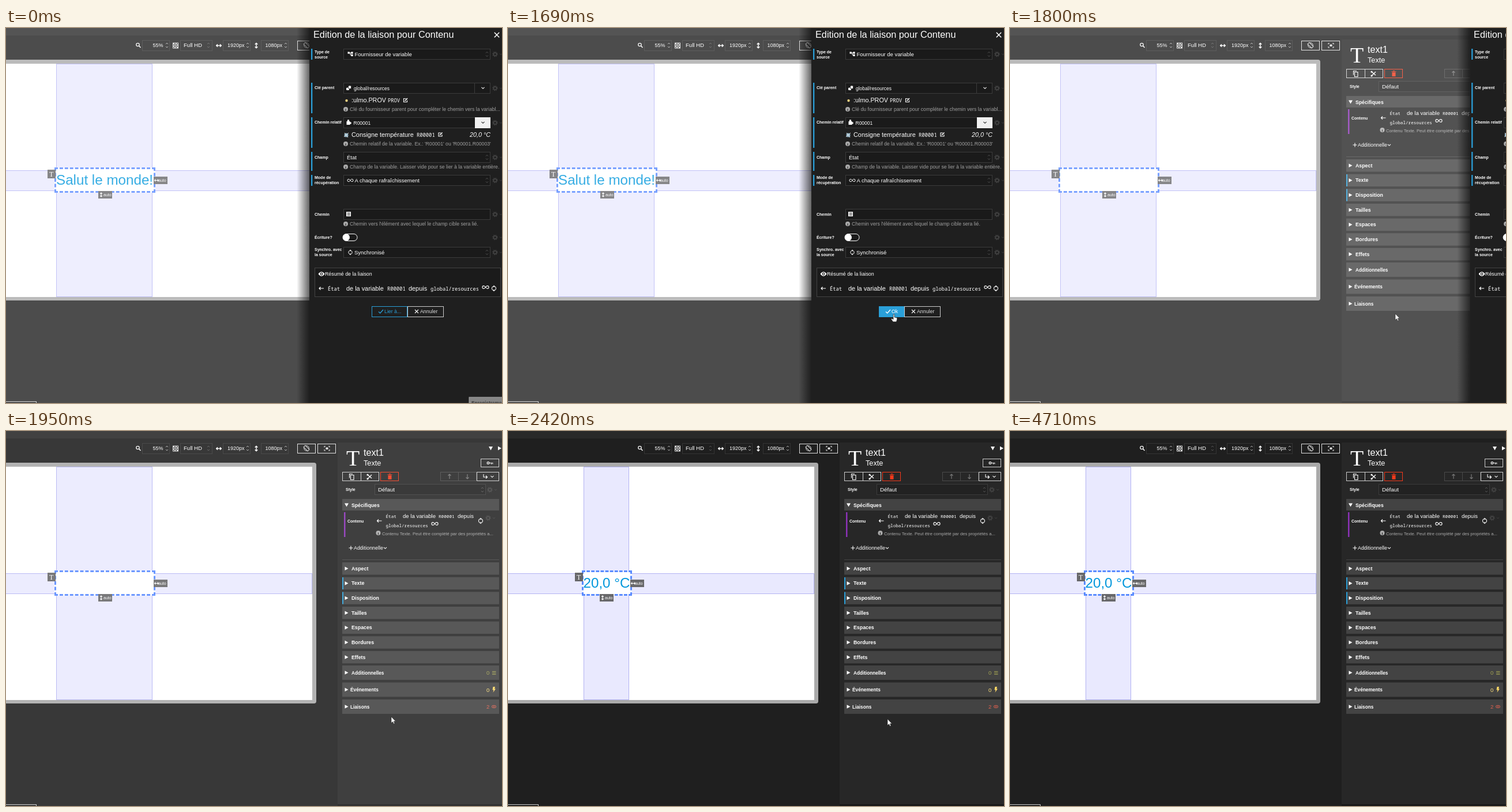
Recreate the animation shown at these times as an HTML page. Size 860x651 px, loop 5350 ms.

```html
<!DOCTYPE html>
<html lang="fr">
<head>
<meta charset="utf-8">
<style>
html, body { margin: 0; width: 100%; height: 100%; overflow: hidden; background: #1f1f1f; }
svg { display: block; font-family: "Liberation Sans", Arial, sans-serif; }
.b { font-weight: bold; }
.i { font-style: italic; }
.m { font-family: "Noto Sans Mono", monospace; }
.s { font-family: "Liberation Serif", serif; }
</style>
</head>
<body>
<svg id="stage" width="860" height="651" viewBox="0 0 860 651"></svg>
<script>
const LOOP = 5350, BLUE = '#2a9fd8';
const $ = id => document.getElementById(id);

// Drawing helpers
const text = (x, y, s, size, cls = '', fill = '#fff') =>
  `<text x="${x}" y="${y}" font-size="${size}" class="${cls}" fill="${fill}">${s}</text>`;
const rect = (x, y, w, h, fill = 'none', stroke = 'none', extra = '') =>
  `<rect x="${x}" y="${y}" width="${w}" height="${h}" fill="${fill}" stroke="${stroke}" ${extra}/>`;
const box = (x, y, w, h, stroke = '#fff', fill = 'none') => rect(x + .5, y + .5, w, h, fill, stroke);
const line = (d, stroke = '#fff', w = 1.1, extra = '') =>
  `<path d="${d}" fill="none" stroke="${stroke}" stroke-width="${w}" ${extra}/>`;
const fill = (d, color = '#fff') => `<path d="${d}" fill="${color}"/>`;
const disc = (x, y, r, color = '#fff') => `<circle cx="${x}" cy="${y}" r="${r}" fill="${color}"/>`;
const at = (x, y, s, k = 1) => `<g transform="translate(${x} ${y}) scale(${k})">${s}</g>`;
const group = (id, s) => `<g id="${id}">${s}</g>`;

// Icons, centred on 0,0
const chevron = c => line('M-2.5-1.2L0 1.3L2.5-1.2', c);
const spinner = (c = '#666') => line('M-2-2L0-4L2-2M-2 2L0 4L2 2', c, 1);
const gear = (c = '#444') => `<g fill="none" stroke="${c}"><circle r="2.6" stroke-width="1.5"/>
  <circle r="3.9" stroke-width="1.5" stroke-dasharray="1.6 1.46"/></g>` + at(10, 0, chevron(c), .8);
const cross = line('M-3-3L3 3M-3 3L3-3');
const check = c => line('M-4 .5L-1.3 3L4-3', c, 1.3);
const infinity = line('M0 0C1-2 2-2.4 3.2-2.4A2.4 2.4 0 0 1 3.2 2.4C1 2.4-1-2.4-3.2-2.4A2.4 2.4 0 0 0-3.2 2.4C-2 2.4-1 2 0 0');
const sync = line('M-1.5 3.2A3.6 3.6 0 0 1-1.5-3.3L.5-3.6M1.5-3.2A3.6 3.6 0 0 1 1.5 3.3L-.5 3.6') +
  fill('M-.5-5.5L2-3.6L-.5-1.7ZM.5 5.5L-2 3.6L.5 1.7Z');
const arrow = (c = '#fff') => line('M4 0H-4M-1.5-2.5L-4 0L-1.5 2.5', c, 1.2);
const both = line('M-4 0H4M-2-2.3L-4.3 0L-2 2.3M2-2.3L4.3 0L2 2.3', '#fff', 1.4);
const turn = (a, s) => `<g transform="rotate(${a})">${s}</g>`;
const info = disc(0, 0, 4, '#aaa') + text(-1, 2.6, 'i', 7, 'b s', '#1f1f1f');
const edit = line('M1-3H-3V3H3V0', '#fff', 1.1) + line('M-1 1L3.5-3.5', '#fff', 1.6);
const puzzle = rect(-3.5, -1.5, 6, 6, '#fff') + disc(-.5, -2.6, 1.8) + disc(3, 1.5, 1.8);
const masks = rect(-4, -.5, 5, 4.5, '#fff', 'none', 'rx="1.6"') + rect(-.5, -4, 5, 5.5, '#fff', '#1a1a1a', 'rx="1.6" stroke-width=".8"');
const tree = line('M-3-2H3M0-2V2H3') + rect(-5, -4, 3.6, 3.6, '#fff') + rect(1.5, -4, 3.6, 3.6, '#fff') + rect(1.5, .8, 3.6, 3.6, '#fff');
const lines = c => line('M-3-2.5H3.5M-3 0H3.5M-3 2.5H3.5', c, 1.2);

function toolbar() {
  const num = (x, w, s, sx) => box(x, 21, w, 18, '#343434') + text(sx, 33, s, 9) + at(x + w - 4, 30, spinner('#aaa'));
  let checker = rect(-5, -5, 10, 10, '#ddd');
  for (let i = 0; i < 16; i++) if ((i + (i >> 2)) % 2) checker += rect(-4 + i % 4 * 2, -4 + (i >> 2) * 2, 2, 2, '#333');
  return `<circle cx="228.5" cy="29" r="2.7" fill="none" stroke="#fff" stroke-width="1.2"/>` + line('M230.5 31L233.5 34', '#fff', 1.5) +
    num(236, 47, '55%', 254.5) + at(294, 30.5, checker) +
    box(302, 21, 55, 18, '#343434') + text(308, 33, 'Full HD', 9.6) + at(351, 30, spinner('#555')) +
    at(369, 30.5, both) + num(376, 47, '1920px', 384) + at(434, 30.5, turn(90, both)) + num(442, 47, '1080px', 449.5) +
    box(505, 22, 31, 16, '#ddd') + `<circle cx="521" cy="30" r="4.3" fill="none" stroke="#ddd"/>` +
    rect(-5, -2, 10, 4, '#1f1f1f', '#ddd', 'transform="translate(521 30) rotate(45)"') +
    box(540, 22, 31, 16, '#ddd') + line('M552 28.5V26.5H554M559 26.5H561V28.5M561 32V34H559M554 34H552V32', '#ddd') + rect(554.5, 28.5, 4, 3.5, '#ddd');
}

// Selected text with its guide bands, from left l to right r
function guides(id, l, r, mid) {
  const a = l - 3, z = r + 5, edge = '#b3b3f3', n = Math.round((z - a) / 9);
  const dash = (d, gap) => line(d, '#5a8bff', 3, `stroke-dasharray="6 ${gap}"`);
  const chip = (x, y, w, h) => rect(x, y, w, h, '#68686a');
  return group(id, rect(l, 62, r - l, 405, '#e9e9fe') + rect(0, 247, 531, 36, '#e9e9fe') +
    line(`M${l + .5} 62V467M${r - .5} 62V467M${l} 62.5H${r}M${l} 466.5H${r}M0 247.5H531M0 282.5H531M530.5 247V283`, edge, 1) +
    rect(a, 242, z - a, 44, '#fff') +
    dash(`M${a} 243.5H${z}M${a} 284.5H${z}`, (z - a - 6 * (n + 1)) / n || 3) +
    dash(`M${a + 1.5} 242V286M${z - 1.5} 242V286`, 3.5) +
    chip(a - 12, 246, 14, 15) + text(a - 9, 258, 'T', 12, 's') +
    chip(z - 3, 258, 24, 13) + at(z + 2, 264.5, both, .8) + text(z + 5, 267, 'auto', 7) +
    chip(mid - 11, 283, 24, 13) + at(mid - 6, 289.5, turn(90, both), .8) + text(mid - 2, 292, 'auto', 7));
}

function sidePanel() {
  const dim = '#4a4a4a', red = '#f4391b';
  const section = (y, h, name, x = 599, size = 8.8) => rect(583, y, 272, h, '#434343') +
    fill(`M587.5 ${y + h / 2 - 3.3}L593.5 ${y + h / 2}L587.5 ${y + h / 2 + 3.3}Z`) + text(x, y + h / 2 + 3, name, size, 'b');
  let s = rect(575, 20, 285, 628, '#272727') + rect(575, 648, 285, 3, '#181818') +
    text(590, 60, 'T', 38, 's') + text(620, 43, 'text1', 16.1) + text(620, 60, 'Texte', 12.7) +
    fill('M837 27H844L840.5 33.5ZM853 26.5L859 30L853 33.5Z') +
    box(823, 48, 31, 14, '#ccc') + `<circle cx="836" cy="55.5" r="1.8" fill="none" stroke="#ddd" stroke-width="1.4"/>` + line('M838 55.5H844.5M841.5 55.5V58M843.8 55.5V57.5', '#ddd') +
    box(583, 71, 32, 15, '#ccc') + box(615, 71, 31, 15, '#ccc') + box(649, 71, 31, 15, red) +
    box(753, 71, 31, 15, dim) + box(784, 71, 31, 15, dim) + box(816, 71, 38, 15, '#ccc') +
    line('M595.5 81.5V74.5H601M597.5 76.5H603V84.5H597.5Z') +
    line('M627 76L634 82M627 83L634 76', '#fff', 1.2) + disc(627, 76, 1.6) + disc(627, 83, 1.6) +
    rect(662.5, 77, 6, 7, red) + line('M661.5 75.7H669.5M664 74.5H667', red) +
    at(769, 79, turn(90, arrow('#777'))) + at(800, 79, turn(-90, arrow('#777'))) +
    line('M828 75V80H834M832 77.5L834.5 80L832 82.5') + at(843, 79, chevron('#fff')) +
    text(589, 104, 'Style', 7, 'b') + box(639, 92, 192, 18, '#3b3b3b', '#222') + text(645, 105, 'Défaut', 9.8) +
    at(826, 102, spinner('#555')) + at(839, 102, gear()) +
    rect(583, 118, 272, 20, '#434343') + fill('M587 125.5H594L590.5 131.5Z') + text(599, 131.5, 'Spécifiques', 8.7, 'b') +
    rect(586, 141, 2.5, 43, '#8c32b8') + text(592, 158.5, 'Contenu', 7, 'b') + at(647.5, 156, arrow()) +
    text(658.5, 151, 'État', 7.7, 'm') + text(688, 151, 'de la variable', 9.6) + text(750, 151, 'R00001', 7.7, 'm') + text(783, 151, 'depuis', 9.5) +
    text(658.5, 167, 'global/resources', 7.65, 'm') + at(743.5, 161, infinity) + at(823, 156, sync) + at(836, 151, gear()) +
    at(645.5, 177, info) + text(652, 180.5, 'Contenu Texte. Peut être complété par des propriétés a...', 7.6, '', '#aaa') +
    line('M594.5 203H601.5M598 199.5V206.5') + text(603, 206, 'Additionnelle', 8.9) + at(657.5, 203, chevron('#fff')) +
    rect(583, 223, 272, 1, '#444');
  ['Aspect', 'Texte', 'Disposition', 'Tailles', 'Espaces', 'Bordures', 'Effets'].forEach((name, i) => {
    s += section(228 + i * 25.65, 21.5, name);
  });
  s += rect(583, 254, 2, 21, BLUE) + rect(583, 279.5, 2, 21, BLUE);
  s += section(407, 25, 'Additionnelles', 599, 8.2) + section(436.5, 25, 'Événements', 597, 8.3) + section(466, 25, 'Liaisons', 597, 8.2);
  return s + text(833, 423, '0', 9.5, '', '#a3a352') + at(846, 420, lines('#a3a352')) +
    text(833, 452.5, '0', 9.5, '', '#ffe27a') + fill('M844.5 444H848L847 447.5H849L844.5 454L845.5 449.5H843.5Z', '#ffd966') +
    text(833, 481.5, '2', 9.5, '', '#e0604f') + rect(842.5, 476.5, 7, 4, 'none', '#e0604f', 'rx="2"') + line('M844.5 478.5H847.5', '#e0604f');
}

function drawer() {
  const bar = (y, h) => rect(529, y, 2.3, h, BLUE);
  const label = (y, ...rows) => rows.map((r, i) => text(535, y + i * 8.7, r, 7, 'b')).join('');
  const field = (y, s, x, size = 9.5) => box(585, y, 254, 18, '#3b3b3b', '#1a1a1a') + text(x, y + 12.5, s, size) + at(848, y + 9.5, gear());
  const select = (y, s, x) => field(y, s, x) + at(834, y + 9.5, spinner('#555'));
  const hint = (y, s) => at(589, y - 3, info) + text(596, y, s, 8.7, '', '#a0a0a0');
  return rect(504, 0, 22, 651, 'url(#shade)') + rect(526, 0, 334, 651, '#1f1f1f') +
    text(533, 17, 'Edition de la liaison pour Contenu', 16.3) + at(851, 12, cross, 1.4) +
    bar(36, 19) + label(44, 'Type de', 'source') + select(36, 'Fournisseur de variable', 604.5) + at(597, 45, tree, .9) +
    bar(95, 53) + label(106, 'Clé parent') + field(95, 'global/resources', 603, 8.45) + at(594, 104, masks) +
    line('M812.5 95V113', '#3b3b3b') + at(827, 104, chevron('#fff')) +
    disc(590.5, 126, 2.2, '#f0d080') + text(599, 129, ':ulmo.PROV', 10.8) + text(662, 129, 'PROV', 8.8, 'm') + at(692.5, 125.5, edit) +
    hint(144, 'Clé du fournisseur parent pour compléter le chemin vers la variabl...') +
    bar(155, 53) + label(166, 'Chemin relatif') + field(155, 'R00001', 602.5, 8.5) + at(594, 163.5, puzzle) +
    rect(813, 155, 27, 19, '#f0f0f0') + at(827, 164, chevron('#222')) +
    disc(590, 186, 3.5, '#8fb4c8') + line('M586 189L594 182M587 182L593 190', '#e4e4e4', 1) +
    text(599, 188.5, 'Consigne température', 10.9) + text(712, 188.5, 'R00001', 8.8, 'm') + at(753, 185, edit) + text(804, 188.5, '20,0 °C', 10.8, 'i') +
    hint(204, "Chemin relatif de la variable. Ex.: 'R00001' ou 'R00001.R00003'") +
    bar(215, 33) + label(227, 'Champ') + select(215, 'État', 591) +
    hint(244, 'Champ de la variable. Laisser vide pour se lier à la variable entière.') +
    bar(255, 19) + label(262, 'Mode de', 'récupération') + select(255, 'A chaque rafraîchissement', 604.5) + at(597, 264.5, infinity, .9) +
    label(325.5, 'Chemin') + field(314, '', 0) + rect(590, 319, 8, 8, '#fff') + at(594, 323, lines('#333'), .8) +
    hint(343, "Chemin vers l'élément avec lequel le champ cible sera lié.") +
    label(365.5, 'Écriture?') + rect(584, 357.5, 25, 12, '#1a1a1a', '#fff', 'rx="6"') + disc(590, 363.5, 6) + at(848, 363.5, gear()) +
    label(387, 'Synchro. avec', 'la source') + select(380, 'Synchronisé', 604) + at(597, 389.5, sync, .9) +
    box(535, 416, 322, 50, '#444', '#1b1b1b') +
    fill('M541.5 427Q547 419.5 552.5 427Q547 434.5 541.5 427') + disc(547, 427, 2.4, '#1b1b1b') + disc(547, 427, 1.2) +
    text(553, 430, 'Résumé de la liaison', 8.8) + at(547, 452, arrow()) +
    text(558, 455.5, 'État', 8.8, 'm') + text(590, 455.5, 'de la variable', 10.9) + text(661, 455.5, 'R00001', 8.8, 'm') +
    text(698, 455.5, 'depuis', 10.9) + text(736, 455.5, 'global/resources', 8.75, 'm') + at(831.5, 450, infinity) + at(846, 452, sync) +
    group('link', box(634, 483, 61, 18, BLUE) + at(650, 492, check(BLUE)) + text(656, 495, 'Lier à...', 8.8, '', BLUE) +
      group('hover', rect(634, 483, 62, 19, BLUE) + at(650, 492, check('#fff')) + text(656, 495, 'Lier à...', 8.8))) +
    group('ok', rect(643, 483, 45, 19, BLUE) + at(659, 492, check('#fff')) + text(665, 495, 'Ok', 8.8)) +
    group('cancel', box(696, 483, 62, 18, '#ccc') + at(712, 492, cross) + text(718, 495, 'Annuler', 8.8, '', '#ddd'));
}

$('stage').innerHTML = `<defs><linearGradient id="shade"><stop stop-color="#000" stop-opacity="0"/>
  <stop offset="1" stop-color="#000" stop-opacity=".6"/></linearGradient></defs>` +
  rect(0, 0, 860, 651, '#1f1f1f') + rect(0, 0, 860, 13, '#292929') + toolbar() +
  rect(-9, 55, 547, 418, '#aaa', 'none', 'rx="4"') + rect(0, 62, 531, 405, '#fff') +
  guides('wide', 87, 254, 171) + guides('narrow', 131, 210, 170) +
  group('hello', text(87, 272, 'Salut le monde!', 24.2, '', '#0498dc')) +
  group('value', text(130.5, 272, '20,0 °C', 24.2, '', '#0498dc')) +
  sidePanel() + box(-5, 648, 57, 9, '#ccc') +
  group('veil', rect(0, 0, 860, 651, '#fff')) + group('drawer', drawer()) +
  group('tip', rect(803, 641, 60, 12, '#858585', '#a5a5a5') + text(807, 654, 'Enregistrement', 8.2, 'b', '#333')) +
  group('arrow', `<path d="M0 0V11L2.6 8.7L4.3 12.4L6 11.6L4.4 8H7.6Z" fill="#fff" stroke="#222" stroke-width=".6"/>`) +
  group('hand', `<path d="M-1 0Q0-1.2 1 0V5L5 6Q6 6.5 5.8 8L4.5 13H-1.5L-4.5 8.5Q-4.5 7-3 7.5L-1 9Z" fill="#fff" stroke="#222" stroke-width=".7"/>`);

// Moments at which the screen is refreshed
const ticks = [0, 70];
const run = (from, to, n) => { for (let i = 0; i < n; i++) ticks.push(from + (to - from) * i / (n - 1)); };
run(330, 810, 8); run(880, 1210, 6);
ticks.push(1410, 1690, 1740, 1800, 1890, 1960, 2020, 2090, 2150);
run(2230, 2420, 4); run(4070, 4560, 8); ticks.push(4620, 4710);

// Pointer path: time, x, y
const path = [[330, 735, 604], [810, 666, 514], [880, 668, 499], [1210, 668, 496], [1410, 669, 497], [1690, 669, 497],
  [1740, 668, 496], [2150, 668, 496], [2420, 658, 500], [4000, 658, 500], [4070, 657.5, 505], [4560, 829, 641], [4710, 834, 646]];
const clamp = (t, a, b) => Math.min(1, Math.max(0, (t - a) / (b - a)));
const show = (id, on) => $(id).style.display = on ? '' : 'none';
const move = (id, x, y) => $(id).setAttribute('transform', `translate(${x} ${y})`);

function draw(now) {
  const time = now % LOOP, t = ticks.findLast(k => k <= time);
  const i = Math.max(1, path.findIndex(p => p[0] > t)), [a, b] = [path[i - 1], path[i]];
  const k = clamp(t, a[0], b[0]), e = k * k * (3 - 2 * k);
  const x = a[1] + (b[1] - a[1]) * e, y = a[2] + (b[2] - a[2]) * e;
  const hand = t >= 880 && t < 1740;
  for (const id of ['arrow', 'hand']) {
    move(id, x, y);
    show(id, t >= 330 && t < 4710 && hand === (id === 'hand'));
  }
  show('tip', t < 70);
  show('hello', t < 1740);
  show('wide', t < 2090);
  show('narrow', t >= 2090);
  show('link', t < 1690);
  show('ok', t >= 1690);
  move('cancel', t < 1690 ? 0 : -9, 0);
  $('hover').style.opacity = clamp(t, 860, 1210);
  $('value').style.opacity = clamp(t, 1950, 2420);
  $('veil').style.opacity = .2 * (1 - clamp(t, 1800, 2000));
  move('drawer', 360 * (1 - (1 - clamp(t, 1690, 1920)) ** 2.15), 0);
  requestAnimationFrame(draw);
}
const start = performance.now();
const tick = () => draw(Math.max(0, performance.now() - start));
requestAnimationFrame = (raf => () => raf(tick))(requestAnimationFrame.bind(window));
tick();
</script>
</body>
</html>
```
